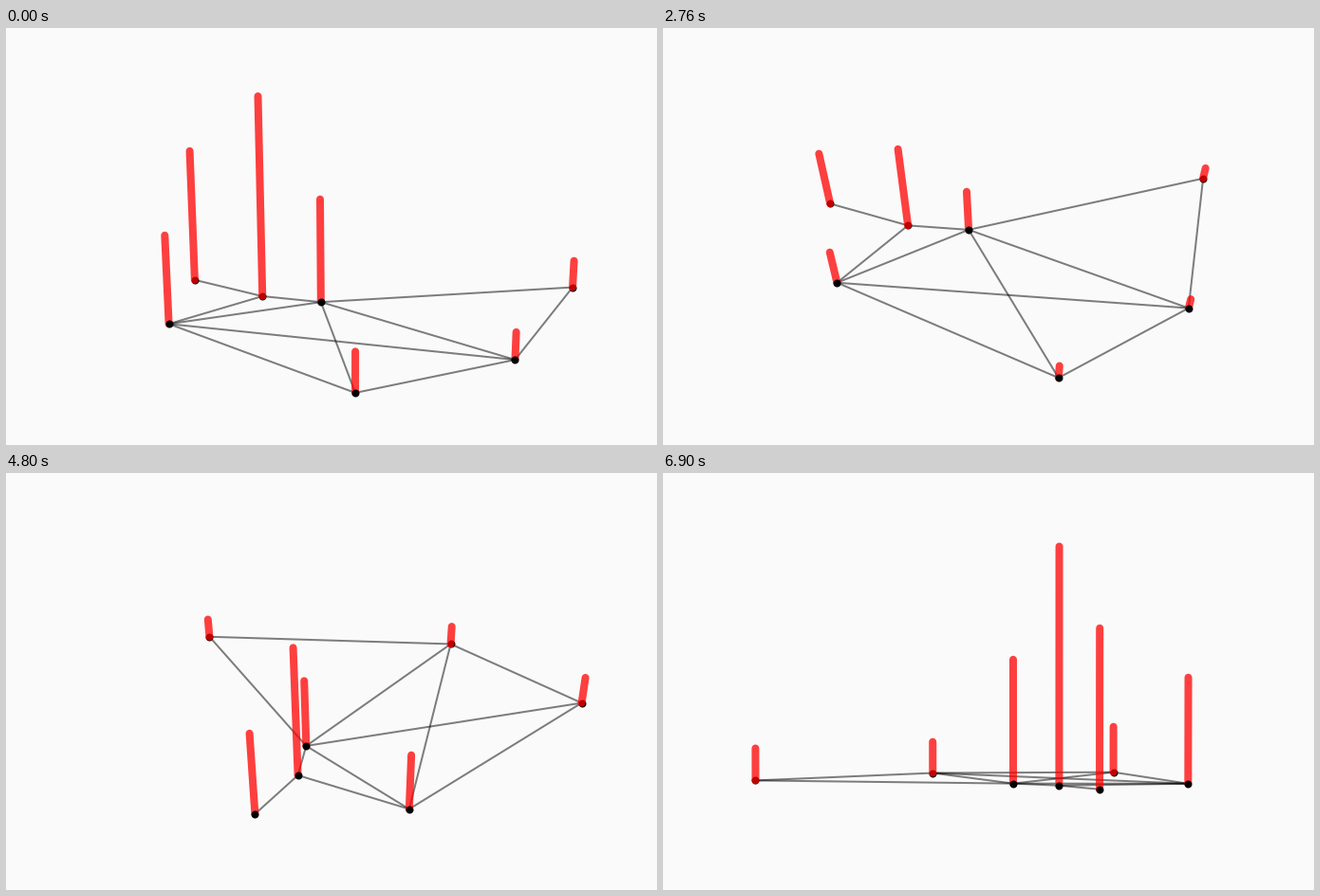
Write a matplotlib script that moves like this. It is 686 by 440 pixels and loops after 8.28 s.

```python
import numpy as np
import matplotlib.pyplot as plt
from matplotlib.animation import FuncAnimation
from matplotlib.collections import LineCollection

WIDTH, HEIGHT, DPI = 686, 440, 100
PX = 72 / DPI  # points per pixel
STEP_MS, FRAMES = 60, 138
FIRST_STEP = 26

# Graph on the ground plane: x, y and bar height of each node
NODES = np.array([
    (-225.5, 5.8, 292), (-127.3, 3.4, 442), (-63, 25.3, 232), (-143, -137.8, 198.6),
    (160.9, -203.3, 91), (225.6, -12.6, 62), (122.4, 239, 61.3),
])
EDGES = np.array([(0, 1), (1, 2), (1, 3), (2, 3), (2, 6), (2, 5),
                  (2, 4), (3, 5), (3, 4), (4, 5), (5, 6)])
FAR_COUNT = 3  # the farthest nodes lie under the bars

# Camera
CENTER = np.array([365, 201])
DISTANCE = 4450
GROUND = -223
ASPECT = 0.556

# Drag path: step, azimuth, elevation (degrees)
STEPS, AZIMUTHS, ELEVATIONS = np.array([
    (0, -37.7, 29.8), (9, -35.1, 48.2), (14, -33, 62), (28, -16, 79),
    (33, 0, 84), (42, 26.8, 78), (47, 43.6, 69.2), (56, 66.3, 54.5),
    (63, 82, 43), (70, 98.9, 16.7), (74, 107.3, 6.4), (84, 112.3, 1.8),
    (90, 115.2, 1.4),
]).T


def smooth(t, times, values):
    """Monotone cubic interpolation, at rest at both ends."""
    slope = np.diff(values) / np.diff(times)
    left, right = slope[:-1], slope[1:]
    tangent = np.zeros(len(values))
    same = left * right > 0
    tangent[1:-1][same] = (2 * left * right)[same] / (left + right)[same]

    i = min(np.searchsorted(times, t, side="right") - 1, len(times) - 2)
    span = times[i + 1] - times[i]
    u = (t - times[i]) / span
    ease = u * u * (3 - 2 * u)
    return (values[i] * (1 - ease) + values[i + 1] * ease
            + span * u * (1 - u) * ((1 - u) * tangent[i] - u * tangent[i + 1]))


def project(z, azimuth, elevation):
    """Screen positions and depths of the nodes raised to height z."""
    x, y = NODES[:, 0], NODES[:, 1]
    across = x * np.cos(azimuth) - y * np.sin(azimuth)
    away = x * np.sin(azimuth) + y * np.cos(azimuth)
    up = away * np.sin(elevation) + z * np.cos(elevation)
    depth = DISTANCE + away * np.cos(elevation) - z * np.sin(elevation)
    offset = np.column_stack([across, -ASPECT * up]) * (DISTANCE / depth)[:, None]
    return CENTER + offset, depth


fig = plt.figure(figsize=(WIDTH / DPI, HEIGHT / DPI), dpi=DPI, facecolor="#fafafa")
ax = fig.add_axes([0, 0, 1, 1])
ax.set(xlim=(0, WIDTH), ylim=(HEIGHT, 0))
ax.axis("off")


def add_lines(color, alpha, width, zorder):
    lines = LineCollection([], colors=color, alpha=alpha, linewidths=width * PX,
                           capstyle="round", snap=False, zorder=zorder)
    return ax.add_collection(lines, autolim=False)


def add_dots(zorder):
    return ax.scatter([], [], s=(8 * PX) ** 2, c="black", linewidths=0, zorder=zorder)


edges = add_lines("black", 0.5, 2, 1)
far_dots = add_dots(2)
bars = add_lines("red", 0.75, 8, 3)
near_dots = add_dots(4)


def draw(frame):
    step = np.clip(frame - FIRST_STEP + 1, 0, STEPS[-1])
    azimuth = np.radians(smooth(step, STEPS, AZIMUTHS))
    elevation = np.radians(smooth(step, STEPS, ELEVATIONS))
    base, depth = project(GROUND, azimuth, elevation)
    top, _ = project(GROUND + NODES[:, 2], azimuth, elevation)
    order = np.argsort(-depth)

    edges.set_segments(base[EDGES])
    bars.set_segments(np.stack([base, top], axis=1)[order])
    far_dots.set_offsets(base[order[:FAR_COUNT]])
    near_dots.set_offsets(base[order[FAR_COUNT:]])
    return edges, far_dots, bars, near_dots


animation = FuncAnimation(fig, draw, frames=FRAMES, interval=STEP_MS,
                          repeat=True, repeat_delay=0)
plt.show()
```
